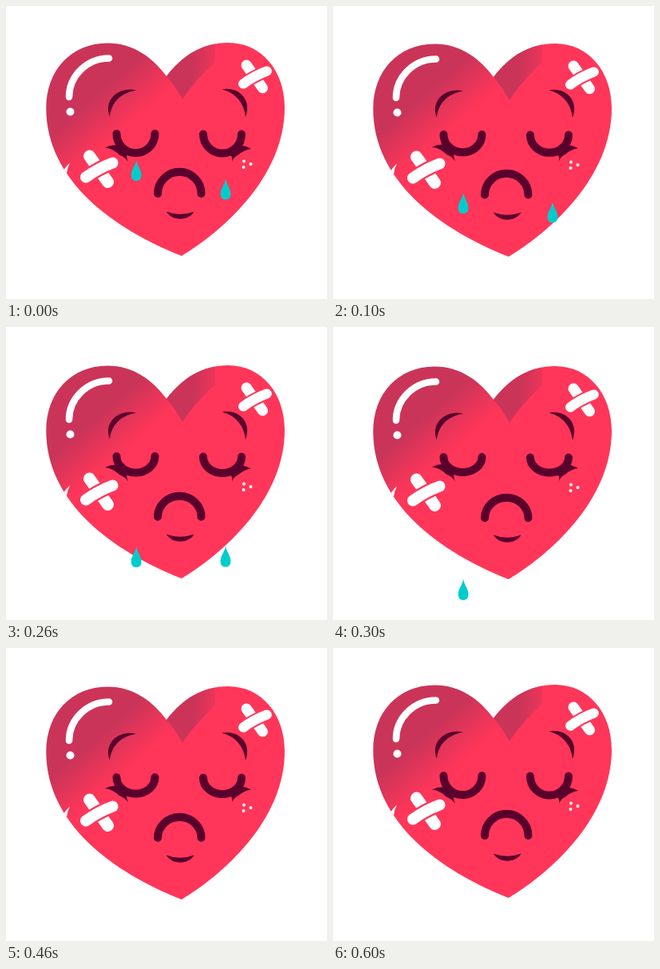
Recreate the animation shown at these times as an HTML page. Size 402 by 367 pixels, loop 0.7 s.

```html
<!DOCTYPE html>
<html lang="en">
<head>
<meta charset="utf-8">
<title>Sad heart</title>
<style>
  html, body { margin: 0; width: 100%; height: 100%; overflow: hidden; background: #fff; }
  svg { display: block; width: 100%; height: 100%; }
  .line { fill: none; stroke-linecap: round; }
  .ink { fill: #5a002d; }
  .ink-line { stroke: #5a002d; stroke-width: 10; }
  .white { fill: #fff; }
  .white-line { stroke: #fff; }
  .gap { stroke: #ff3659; stroke-linecap: butt; }
</style>
</head>
<body>
<svg viewBox="0 0 402 367">
  <defs>
    <linearGradient id="lobeShade" gradientUnits="userSpaceOnUse" x1="116" y1="110" x2="152" y2="151">
      <stop offset="0" stop-color="#cb3459"/>
      <stop offset="1" stop-color="#ff3659"/>
    </linearGradient>
    <linearGradient id="notchShade" gradientUnits="userSpaceOnUse" x1="234" y1="75" x2="278" y2="77">
      <stop offset="0" stop-color="#cb3459"/>
      <stop offset="1" stop-color="#ff3659"/>
    </linearGradient>
    <path id="outline" d="M50.3 128C50.3 80 82 46.5 127 46.5C160 46.5 184 65 201 88C221 62 246 46 278 46C321 46 349 82 349 127C349 215 270 283 220 313C134 279 50.3 218 50.3 128Z"/>
    <clipPath id="inside"><use href="#outline"/></clipPath>
    <path id="drop" d="M0 0C1.5 8 6.4 12 6.4 18.5C6.4 23.5 4 26 0 26S-6.4 23.5 -6.4 18.5C-6.4 12 -1.5 8 0 0Z" fill="#00cccc"/>
    <g id="bandage" class="line white-line">
      <path stroke-width="15" d="M-12.3 -17.5L10.7 15"/>
      <path class="gap" stroke-width="18.5" d="M-16.8 9Q-1.8 -2 16.7 -9"/>
      <path stroke-width="14" d="M-16.8 9Q-1.8 -2 16.7 -9"/>
    </g>
  </defs>

  <g id="heart">
    <use href="#outline" fill="url(#lobeShade)"/>
    <g clip-path="url(#inside)">
      <path d="M201 88L221 40L262 40V70C246 85 231 101 221 117C216 107 208 96 201 88Z" fill="url(#notchShade)"/>
      <path class="white" d="M80 196.5Q76 200 71 207L76 210Q77 202 80 196.5Z"/>
    </g>

    <path class="line white-line" stroke-width="8.5" d="M79 114C79 88 101 65.5 129 65.5"/>
    <circle class="white" cx="80.5" cy="132.5" r="5"/>
    <use href="#bandage" transform="translate(116.8 205.5)"/>
    <use href="#bandage" transform="translate(312 89.5) scale(.88)"/>

    <g class="ink">
      <path d="M163 105.5C144 100 121 115.5 130 138.5C132 121 143 109 163 105.5Z"/>
      <path d="M270.5 104.5C289 100 309 115.5 300 139C298 121.5 288 109 270.5 104.5Z"/>
      <path d="M201 257.5Q218 264 235.5 257.5C229 269.5 208 270 201 257.5Z"/>
    </g>
    <g id="lashes" class="ink">
      <path d="M124 177.5Q133 172.5 142 175L151 186Q151 191 153 195Q149 189 142 186.5Q133 178 124 177.5Z"/>
      <path d="M307 179Q298 174 290 175L281 186Q284 190 283 195Q285 189 291 186.5Q298 180 307 179Z"/>
    </g>
    <g class="line ink-line">
      <path id="leftEye"/>
      <path id="rightEye"/>
      <path id="mouth"/>
    </g>

    <g class="white">
      <circle cx="298" cy="194.5" r="2"/>
      <circle cx="306.5" cy="198" r="2"/>
      <circle cx="297.5" cy="202" r="2"/>
    </g>
  </g>

  <use id="leftTear" href="#drop"/>
  <use id="rightTear" href="#drop"/>
</svg>
<script>
  const STEP = 100;
  const STEPS = 7;
  const byId = id => document.getElementById(id);
  const tears = [
    { el: byId("leftTear"), x: 163.2, y: 193, speed: 41, steps: 4 },
    { el: byId("rightTear"), x: 275, y: 216.5, speed: 29, steps: 3 }
  ];

  function move(el, x, y) {
    el.setAttribute("transform", `translate(${x} ${y})`);
  }

  function arc(id, x, y, rx, ry, sweep) {
    byId(id).setAttribute("d", `M${x - rx} ${y}A${rx} ${ry} 0 0 ${sweep} ${x + rx} ${y}`);
  }

  function render(time) {
    const step = Math.floor(time / STEP) % STEPS;
    const sag = 3 - Math.abs(step - 3);

    // As the heart sinks, the eyes and mouth flatten.
    move(byId("heart"), 0, sag);
    move(byId("lashes"), 0, -1.7 * sag);
    arc("leftEye", 162.5, 160, 24, 24 - 1.7 * sag, 0);
    arc("rightEye", 271, 160.5, 24, 24 - 1.7 * sag, 0);
    arc("mouth", 217.3, 235 + 0.4 * sag, 27.2, 27.2 - 0.6 * sag, 1);

    for (const { el, x, y, speed, steps } of tears) {
      move(el, x, y + speed * step);
      el.setAttribute("visibility", step < steps ? "visible" : "hidden");
    }
  }

  let start;
  function tick(now) {
    start ??= now;
    render(now - start);
    requestAnimationFrame(tick);
  }

  render(0);
  requestAnimationFrame(tick);
</script>
</body>
</html>
```
